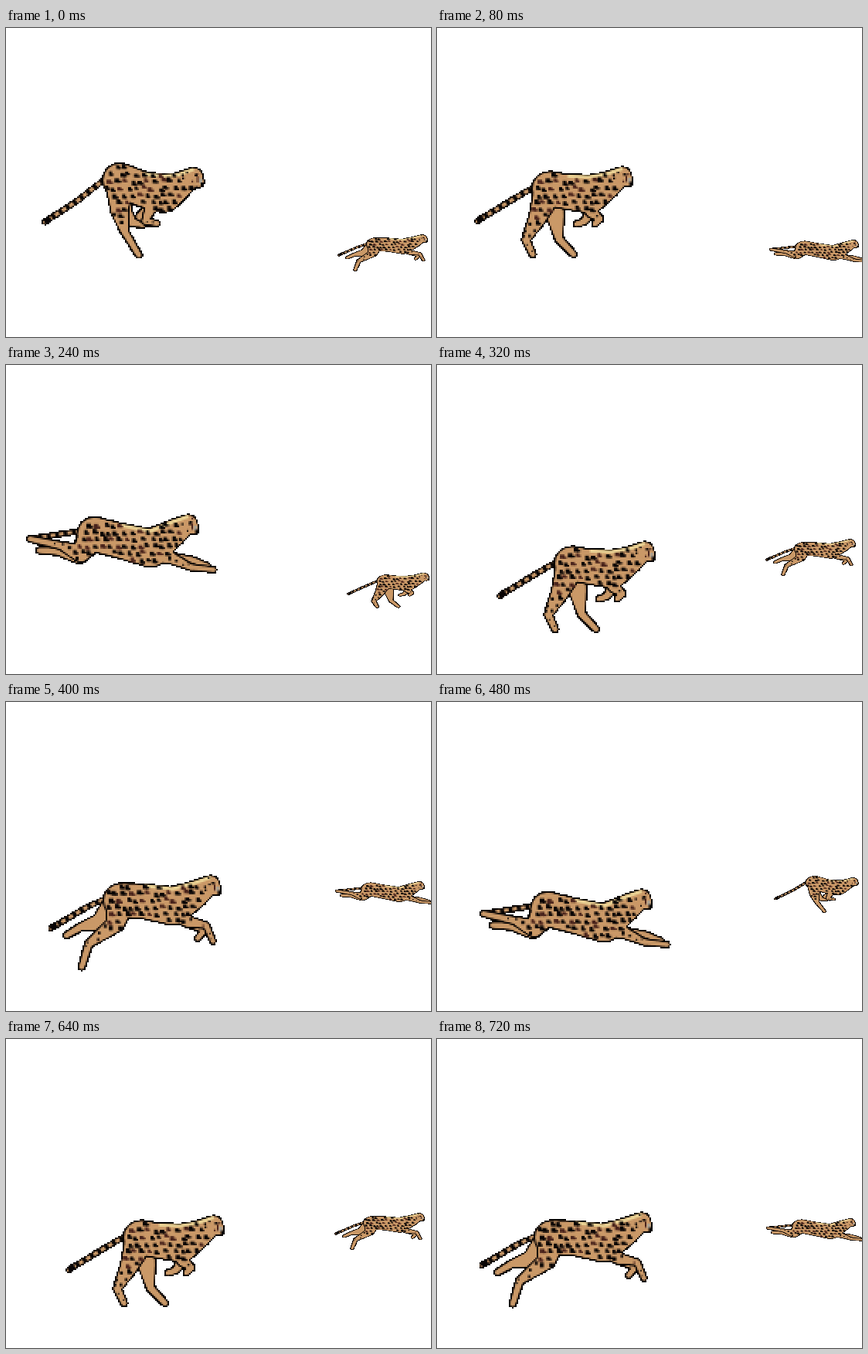
These frames come from a looping animation (550 by 400 pixels, 800 ms). An HTML page with a canvas:

```html
<!DOCTYPE html>
<html lang="en">
<head>
<meta charset="utf-8">
<title>Running cheetahs</title>
<style>
  html, body { margin: 0; width: 100%; height: 100%; overflow: hidden; background: #fff; }
  canvas { display: block; }
</style>
</head>
<body>
<canvas id="stage" width="550" height="400"></canvas>
<script>
const W = 550, H = 400, STEP = 80, STEPS = 10, EDGE = 2;
const TAN = '#ca9968', PALE = '#ead294', INK = '#080404', BROWN = '#4a241c';

// Joints of one gallop: spine runs hip, waist, chest, neck; legs run down to the paw.
const GALLOP = [
  { // gathered
    tail: [[50, 251], [92, 224]],
    spine: [[147, 197], [178, 209], [204, 214], [223, 205]],
    hind: [[147, 237], [154, 264], [172, 294]],
    farHind: [[151, 238], [164, 252], [178, 254]],
    elbow: [187, 233], fore: [[180, 250], [196, 253]], farFore: [[172, 244], [186, 254]]
  },
  { // landing
    tail: [[52, 250], [93, 225]],
    spine: [[145, 208], [169, 212], [197, 215], [220, 204]],
    hind: [[130, 246], [115, 274], [124, 293]],
    farHind: [[153, 243], [158, 273], [177, 293]],
    elbow: [200, 238], fore: [[211, 247], [204, 254]], farFore: [[190, 251], [180, 254]]
  },
  { // reaching
    tail: [[29, 244], [75, 217]],
    spine: [[119, 208], [150, 209], [187, 215], [216, 200]],
    hind: [[113, 238], [78, 264], [69, 294]],
    farHind: [[93, 236], [68, 242], [49, 253]],
    elbow: [206, 235], fore: [[230, 240], [239, 261]], farFore: [[228, 246], [219, 257]]
  },
  { // stretched
    tail: [[31, 225], [76, 218]],
    spine: [[114, 219], [150, 228], [187, 237], [216, 218]],
    hind: [[97, 244], [72, 234], [31, 225]],
    farHind: [[95, 246], [68, 241], [43, 240]],
    elbow: [214, 250], fore: [[240, 262], [269, 265]], farFore: [[240, 252], [261, 260]]
  }
];
const SPINE_RADII = [23, 23, 25, 18, 12, 7];
const HIND_RADII = [20, 12, 6, 5];
const FORE_RADII = [18, 8, 5, 4.5];

const offset = ([x, y], dx, dy) => [x + dx, y + dy];
const mix = (a, b, t) => a + (b - a) * t;

function random(seed) {
  return () => {
    const v = Math.sin(seed++ * 12.9898) * 43758.5453;
    return v - Math.floor(v);
  };
}

// Circles along a chain of joints, with the radius changing evenly between them.
function limb(joints, radii) {
  const circles = [], parts = 16;
  for (let i = 0; i < joints.length - 1; i++) {
    const [ax, ay] = joints[i], [bx, by] = joints[i + 1];
    for (let k = 0; k <= parts; k++) {
      const t = k / parts;
      circles.push({ x: mix(ax, bx, t), y: mix(ay, by, t), r: mix(radii[i], radii[i + 1], t) });
    }
  }
  return circles;
}

function renderCheetah(pose, width, height, transform) {
  const canvas = document.createElement('canvas');
  canvas.width = width;
  canvas.height = height;
  const c = canvas.getContext('2d');
  c.setTransform(...transform);
  c.lineJoin = 'round';

  const fillCircles = (circles, color, inset) => {
    c.fillStyle = color;
    for (const { x, y, r } of circles) {
      c.beginPath();
      c.arc(x, y, r - inset, 0, 7);
      c.fill();
    }
  };
  const flesh = circles => {
    fillCircles(circles, INK, 0);
    fillCircles(circles, TAN, EDGE);
  };
  const line = (points, color, size, dash = []) => {
    c.beginPath();
    for (const [x, y] of points) c.lineTo(x, y);
    c.setLineDash(dash);
    c.strokeStyle = color;
    c.lineWidth = size;
    c.stroke();
  };
  const patch = (color, x, y, w, h) => {
    c.fillStyle = color;
    c.fillRect(x, y, w, h);
  };

  const [hip, , chest, neck] = pose.spine;
  const head = offset(neck, 20, -13), muzzle = offset(head, 7, 8);
  const spine = [...pose.spine, head, muzzle];
  const tail = [...pose.tail, offset(hip, -16, -4)];

  c.lineCap = 'round';
  line(tail, INK, 8);
  line(tail, TAN, 4.5);
  c.lineCap = 'butt';
  line(tail, INK, 6, [5, 6]);
  line(tail, INK, 8, [9, 999]);

  flesh(limb([hip, ...pose.farHind], HIND_RADII));
  flesh(limb([chest, pose.elbow, ...pose.farFore], FORE_RADII));
  const body = [
    ...limb([hip, ...pose.hind], HIND_RADII),
    ...limb([chest, pose.elbow, ...pose.fore], FORE_RADII),
    ...limb(spine, SPINE_RADII)
  ];
  flesh(body);

  const ridge = spine.slice(1, 5).map((p, i) => offset(p, 0, 3 - SPINE_RADII[i + 1]));
  line(ridge, PALE, 4);
  drawSpots(body, head, patch);

  const [hx, hy] = head, [mx, my] = muzzle;
  patch(INK, hx + 1, hy - 3, 4, 3);
  patch(BROWN, hx + 4, hy, 2, 8);
  patch('#aaa294', mx, my - 5, 4, 6);
  patch(INK, mx + 2, my, 4, 5);

  // Hard sprite edges.
  const image = c.getImageData(0, 0, width, height);
  for (let i = 3; i < image.data.length; i += 4) image.data[i] = image.data[i] > 110 ? 255 : 0;
  c.putImageData(image, 0, 0);
  return canvas;
}

// Jittered spots that shrink with the part of the body they sit on.
function drawSpots(body, [hx, hy], patch) {
  const next = random(7);
  for (let y = 160, row = 0; y < 300; y += 9, row++) {
    for (let x = 40 + (row % 2) * 5; x < 260; x += 10) {
      const px = x + next() * 6, py = y + next() * 5;
      const width = 3.5 + next() * 2.5, height = 4 + next() * 2.5;
      const color = next() < 0.8 ? INK : BROWN;
      const girth = Math.max(0, ...body
        .filter(b => Math.hypot(px - b.x, py - b.y) < b.r - 3)
        .map(b => b.r));
      if (!girth) continue;
      const face = Math.hypot(px - hx, py - hy) < 14;
      const scale = face ? 0.5 : Math.min(1, girth / 12);
      patch(color, px - width / 2, py - height / 2, width * scale, height * scale);
      if (girth > 12 && !face) patch(color, px + 1, py, width - 1, height / 2);
    }
  }
}

const bigSprites = GALLOP.map(pose => renderCheetah(pose, W / 2, H / 2, [0.5, 0, 0, 0.5, 0, 0]));
const smallSprites = GALLOP.map(pose => renderCheetah(pose, W + 20, H, [0.52, 0, 0, 0.385, 416, 200]));

const ctx = document.getElementById('stage').getContext('2d');
ctx.imageSmoothingEnabled = false;

function draw() {
  const step = Math.floor(performance.now() / STEP) % STEPS;
  const lower = step >= 4 ? 1 : 0;
  ctx.fillStyle = '#fff';
  ctx.fillRect(0, 0, W, H);
  ctx.drawImage(bigSprites[(step + lower) % 4], lower * 29, lower * 49, W, H);
  ctx.drawImage(smallSprites[(step + 2) % 4], lower * -4, lower * -42);
  requestAnimationFrame(draw);
}
draw();
</script>
</body>
</html>
```
